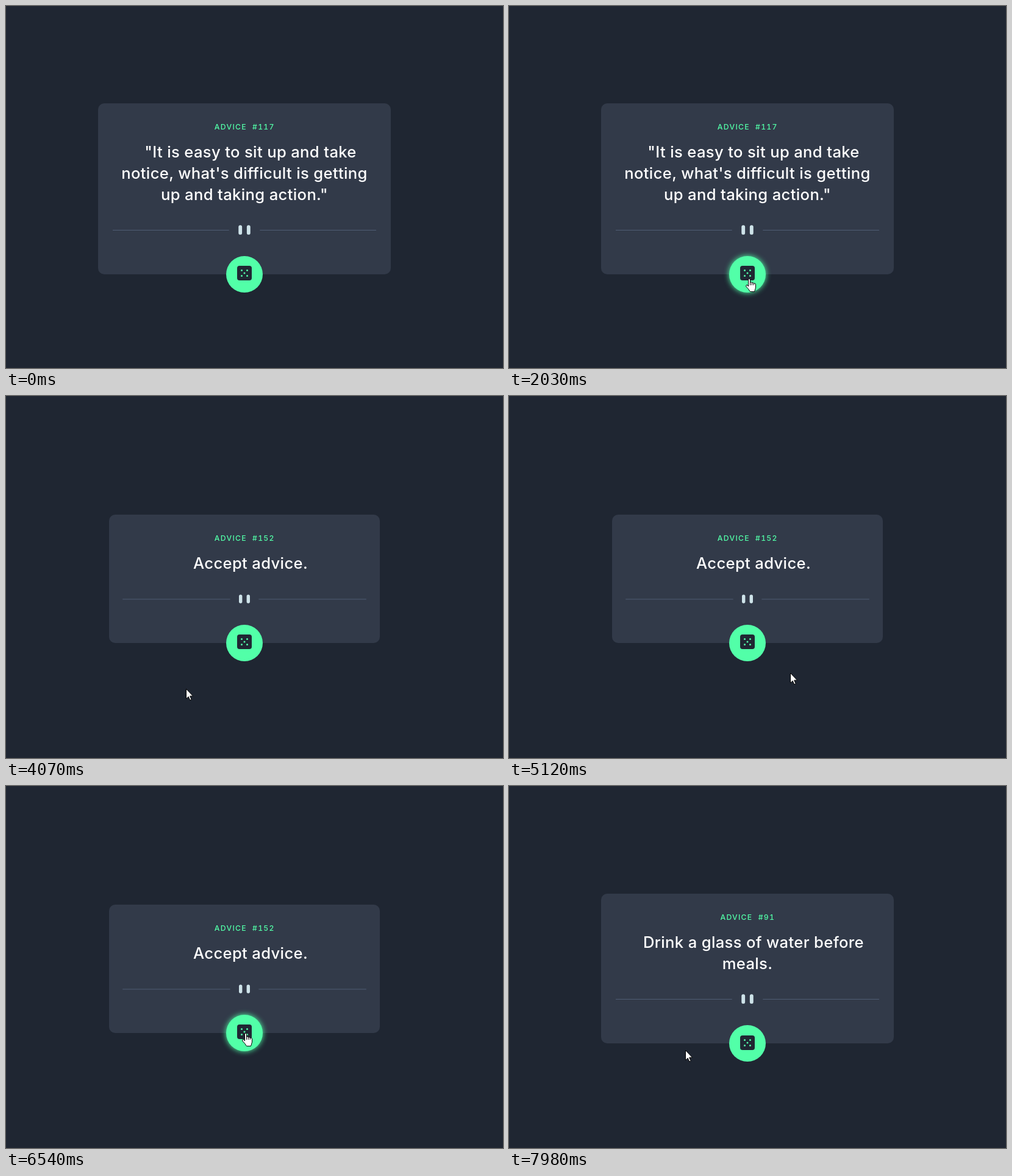
An HTML page that plays this animation: 815 by 595 pixels, repeating every 8 s.

```html
<!DOCTYPE html>
<html lang="en">
<head>
<meta charset="utf-8">
<title>Advice generator</title>
<style>
  html, body { margin: 0; height: 100%; overflow: hidden; background: #1f2632; }
  svg { display: block; }
  text { font-family: Inter, "Open Sans", sans-serif; font-weight: 500; text-anchor: middle; white-space: pre; }
  .label { font-size: 12.2px; letter-spacing: 1.3px; fill: #52ffa8; font-variant-numeric: tabular-nums; }
  .quote { font-size: 25.6px; letter-spacing: .35px; fill: #fff; }
  .glow .button { filter: drop-shadow(0 0 5px #52ffa8); }
  #cursor path { fill: #fff; stroke: #000; stroke-linejoin: round; }
</style>
</head>
<body>
<svg id="stage" width="815" height="595" viewBox="0 0 815 595">
  <defs>
    <g id="divider">
      <path fill="#4f5d74" d="M0 8h196v1H0zM248 8h196v1H248z"/>
      <g fill="#cee3e9">
        <rect x="212" width="6" height="16" rx="3"/>
        <rect x="226" width="6" height="16" rx="3"/>
      </g>
    </g>
    <g id="die">
      <rect width="24" height="24" rx="4" fill="#202733"/>
      <path stroke="#52ffa8" stroke-width="3" stroke-linecap="round"
        d="M7.5 7.5h0M16.5 7.5h0M12 12h0M7.5 16.5h0M16.5 16.5h0"/>
    </g>
  </defs>
  <g id="cards"></g>
  <g id="cursor">
    <path id="arrow" d="M.5 .5V16.7L4.2 13.2 6.8 19 9.2 18 6.7 12.2H11.6Z"/>
    <g id="hand">
      <path d="M-1.5 13V1.5Q0 -.8 1.5 1.5V6Q4 5 4.3 7Q6.8 6 7.2 8Q10.5 7 10.5 10V15L8.5 21.5H1.5Q-1 17 -5.3 13Q-5.5 10 -3 10.5Z"/>
      <path d="M1.5 6V11M4.3 7V11M7.2 8V11"/>
    </g>
    <circle id="press" r="12" fill="#ff0" fill-opacity=".47"/>
  </g>
</svg>
<script>
const LOOP = 8000, STEP = 70, MID_X = 391, MID_Y = 300.5;
const $ = id => document.getElementById(id);

const cards = [
  { from: 0, id: 117, lines: ['"It is easy to sit up and take', "notice, what's difficult is getting", 'up and taking action."'] },
  { from: 2970, id: 152, lines: ["Accept advice."] },
  { from: 6610, id: 91, lines: ["Drink a glass of water before", "meals."] },
];

// The card is centred and grows by one line height per line of text
function cardMarkup({ id, lines }) {
  const width = lines.length > 1 ? 480 : 444;
  const height = 176 + 35 * lines.length;
  const top = Math.floor(MID_Y - height / 2), bottom = Math.floor(MID_Y + height / 2);
  const scale = width * .9 / 444;
  const quote = lines.map((line, i) =>
    `<text class="quote" x="${i ? MID_X : MID_X + 10}" y="${top + 89 + i * 35}">${line}</text>`).join("");
  return `<g>
    <rect x="${MID_X - width / 2}" y="${top}" width="${width}" height="${height}" rx="10" fill="#323a49"/>
    <text class="label" x="${MID_X + .3}" y="${top + 43}">ADVICE  #${id}</text>${quote}
    <use href="#divider" transform="translate(${MID_X - 222 * scale} ${bottom - 65.2 - 16 * scale}) scale(${scale})"/>
    <circle class="button" cx="${MID_X}" cy="${bottom}" r="30" fill="#52ffa8"/>
    <use href="#die" x="${MID_X - 12}" y="${Math.round(MID_Y + height / 2 - 14)}"/>
  </g>`;
}
$("cards").innerHTML = cards.map(cardMarkup).join("");
const views = [...$("cards").children];

// Each move eases from where the last one ended, curving towards `via` if given
const entry = [671, 590];
const moves = [
  { at: 710, ms: 700, to: [397, 466], via: [500, 505] },
  { at: 1410, ms: 280, to: [394, 448] },
  { at: 3370, ms: 490, to: [281, 472] },
  { at: 3860, ms: 1260, to: [461, 455], via: [385, 543] },
  { at: 5120, ms: 630, to: [393, 406] },
  { at: 6540, ms: 840, to: [248, 434], via: [320, 430] },
  { at: 7770, ms: 210, to: [289, 434] },
];

const ease = u => (1 - Math.cos(Math.PI * u)) / 2;

function pointer(t) {
  const i = moves.findLastIndex(m => t >= m.at);
  if (i < 0) return null;
  const { at, ms, to, via } = moves[i];
  const from = i ? moves[i - 1].to : entry;
  const k = ease(Math.min(1, Math.floor((t - at) / STEP) * STEP / ms));
  return from.map((a, axis) => {
    const b = to[axis], c = via ? via[axis] : (a + b) / 2;
    return Math.round((1 - k) ** 2 * a + 2 * k * (1 - k) * c + k * k * b);
  });
}

const within = (t, a, b) => t >= a && t < b;
const show = (el, on) => el.style.display = on ? "" : "none";

function draw(t) {
  const current = cards.findLastIndex(c => t >= c.from);
  views.forEach((view, i) => show(view, i === current));
  const hover = within(t, 1480, 3370) || within(t, 5470, 6820);
  $("stage").classList.toggle("glow", hover);
  const pos = pointer(t);
  show($("cursor"), pos);
  if (pos) $("cursor").setAttribute("transform", `translate(${pos})`);
  show($("hand"), hover);
  show($("arrow"), !hover);
  show($("press"), within(t, 1890, 2030) || within(t, 6210, 6340));
}

const begin = performance.now();
function tick() {
  draw((performance.now() - begin) % LOOP);
  requestAnimationFrame(tick);
}
tick();
</script>
</body>
</html>
```
